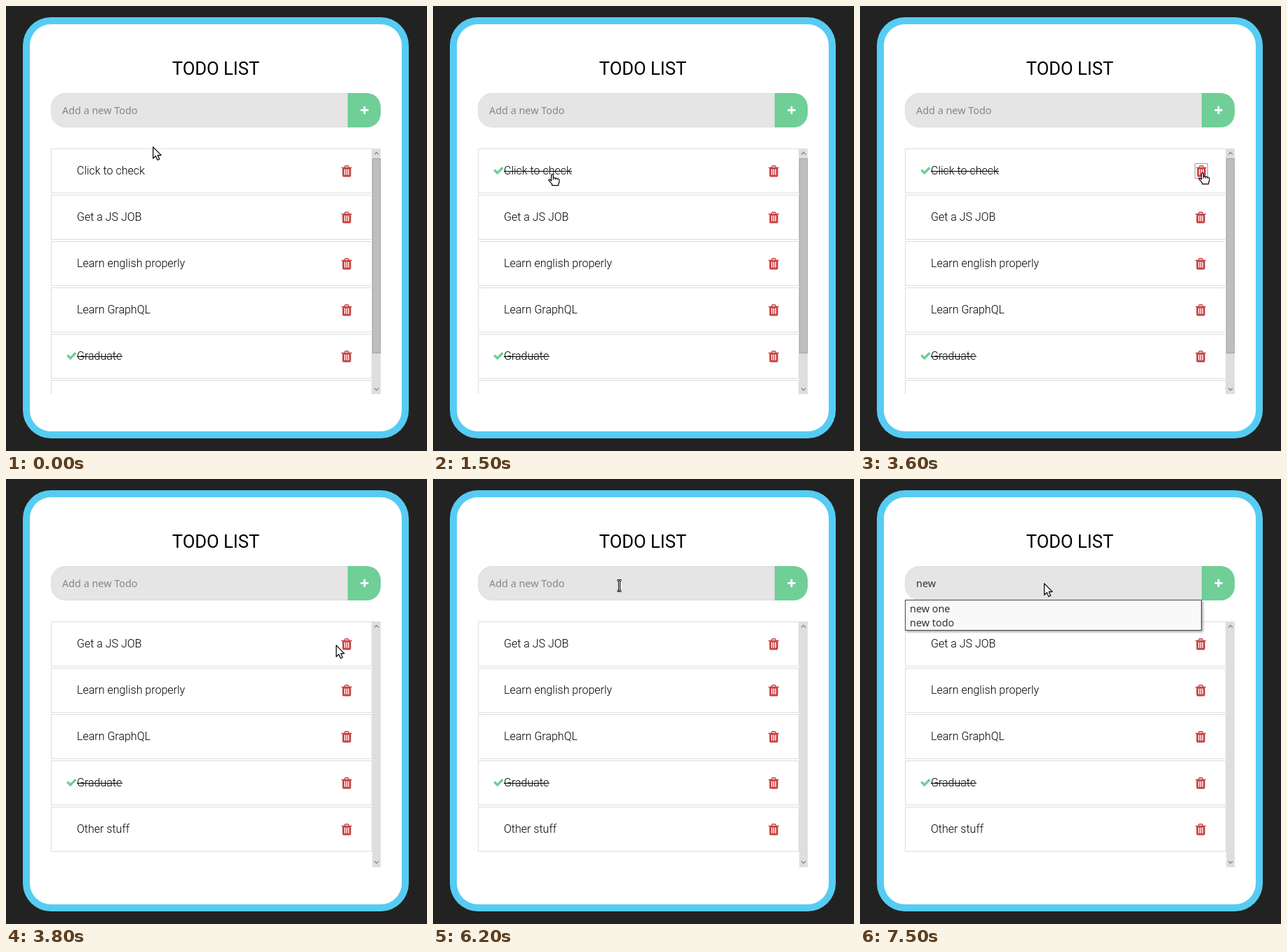
Animation, 600 px wide and 634 px high, one loop 8 s. Source, as an HTML page:

```html
<!DOCTYPE html>
<html lang="en">
<head>
<meta charset="utf-8">
<title>Todo list</title>
<style>
  html, body { margin: 0; width: 100%; height: 100%; overflow: hidden; background: #222; }
  svg { display: block; }
  text { white-space: pre; }
  .title { font: 400 25.6px Roboto, sans-serif; text-anchor: middle; }
  .item { font: 300 16px Roboto, sans-serif; }
  .field { font: 400 14.4px "Noto Sans", "Open Sans", sans-serif; fill: #333; }
  .hint { fill: #868686; }
  .line { fill: none; stroke: #ddd; }
  .trash { fill: #c94040; fill-rule: evenodd; }
  .check { fill: #6fcf97; }
  .chevron { fill: none; stroke: #8c8c8c; stroke-width: 1.5; }
  .popup { fill: #f9f9f9; stroke: #4a4a4a; filter: drop-shadow(2px 2px 1.5px rgba(0, 0, 0, .35)); }

  /* 100 ms = 1.25% of the loop */
  .anim { animation: 8s step-end infinite; }
  #done { animation-name: done; }
  #press { animation-name: press; }
  #focus { animation-name: focus; }
  #list { animation-name: remove; }
  #thumb { animation-name: thumb; }
  #hint { animation-name: hint; }
  #type1 { animation-name: type1; }
  #type2 { animation-name: type2; }
  #type3 { animation-name: type3; }
  #caret { animation-name: caret; }
  #popup { animation-name: popup; }
  #pointer { animation-name: move; }
  #arrow { animation-name: arrow; }
  #hand { animation-name: hand; }
  #beam { animation-name: beam; }

  @keyframes done { 0% { opacity: 0 } 18.75%, 100% { opacity: 1 } }
  @keyframes press { 0%, 46.25%, 100% { transform: none } 45% { transform: translateX(1px) } }
  @keyframes focus { 0%, 46.25%, 100% { opacity: 0 } 45% { opacity: 1 } }
  @keyframes remove { 0% { transform: none } 46.25%, 100% { transform: translateY(-66px) } }
  @keyframes thumb { 0% { opacity: 1 } 46.25%, 100% { opacity: 0 } }
  @keyframes hint { 0% { opacity: 1 } 87.5%, 100% { opacity: 0 } }
  @keyframes type1 { 0%, 88.75%, 100% { opacity: 0 } 87.5% { opacity: 1 } }
  @keyframes type2 { 0%, 90%, 100% { opacity: 0 } 88.75% { opacity: 1 } }
  @keyframes type3 { 0% { opacity: 0 } 90%, 100% { opacity: 1 } }
  @keyframes popup { 0% { opacity: 0 } 88.75%, 100% { opacity: 1 } }
  @keyframes caret {
    0%, 77.5%, 93.75%, 100% { opacity: 0; transform: none }
    62.5% { opacity: 1; transform: none }
    87.5% { opacity: 1; transform: translateX(9px) }
    88.75% { opacity: 1; transform: translateX(17px) }
    90% { opacity: 1; transform: translateX(32px) }
  }
  @keyframes arrow {
    0%, 28.75%, 47.5%, 88.75%, 100% { opacity: 1 }
    11.25%, 36.25%, 60% { opacity: 0 }
  }
  @keyframes hand {
    0%, 28.75%, 47.5%, 100% { opacity: 0 }
    11.25%, 36.25% { opacity: 1 }
  }
  @keyframes beam { 0%, 88.75%, 100% { opacity: 0 } 60% { opacity: 1 } }
  @keyframes move {
    0% { transform: translate(209px, 200px) }
    1.25% { transform: translate(213px, 194px) }
    3.75% { transform: translate(220px, 200px) }
    6.25% { transform: translate(218px, 202px) }
    7.5% { transform: translate(212px, 206px) }
    8.75% { transform: translate(203px, 213px) }
    10% { transform: translate(193px, 221px) }
    11.25% { transform: translate(177px, 229px) }
    12.5% { transform: translate(167px, 236px) }
    13.75% { transform: translate(164px, 239px) }
    27.5% { transform: translate(172px, 243px) }
    28.75% { transform: translate(205px, 256px) }
    30% { transform: translate(262px, 273px) }
    31.25% { transform: translate(335px, 283px) }
    32.5% { transform: translate(402px, 279px) }
    33.75% { transform: translate(455px, 262px) }
    35% { transform: translate(482px, 244px) }
    36.25% { transform: translate(481px, 240px) }
    37.5% { transform: translate(481px, 238px) }
    38.75% { transform: translate(482px, 237px) }
    47.5% { transform: translate(470px, 236px) }
    48.75% { transform: translate(430px, 232px) }
    50% { transform: translate(375px, 224px) }
    51.25% { transform: translate(325px, 214px) }
    52.5% { transform: translate(300px, 210px) }
    57.5% { transform: translate(299px, 206px) }
    58.75% { transform: translate(284px, 178px) }
    60% { transform: translate(262px, 144px) }
    66.25% { transform: translate(261px, 143px) }
    88.75%, 100% { transform: translate(262px, 148px) }
  }
</style>
</head>
<body>
<svg width="600" height="634" viewBox="0 0 600 634">
  <defs>
    <path id="bin" class="trash" transform="translate(478 227)" d="M.4 2.7H3.7L4.5.9Q4.9 0 5.9 0H9.2Q10.2 0 10.6.9L11.4 2.7H14.7Q15.1 2.7 15.1 3.1V3.8Q15.1 4.1 14.7 4.1H13.7V14.3Q13.7 16.5 12 16.5H3.1Q1.4 16.5 1.4 14.3V4.1H.4Q0 4.1 0 3.8V3.1Q0 2.7.4 2.7ZM5.1 2.7H10L9.4 1.4H5.7ZM4.1 5.5h1.4v8.2H4.1ZM6.85 5.5h1.4v8.2h-1.4ZM9.6 5.5H11v8.2H9.6Z"/>
    <path id="tick" class="check" transform="translate(85.4 226.3) scale(.00893)" d="M1671 566q0 40-28 68l-860 860q-28 28-68 28t-68-28l-498-498q-28-28-28-68t28-68l136-136q28-28 68-28t68 28l294 295 656-657q28-28 68-28t68 28l136 136q28 28 28 68z"/>
    <rect id="box" class="line" x="64.5" y="203.5" width="457" height="63"/>
    <g id="row"><use href="#box"/><use href="#bin"/></g>
    <clipPath id="view"><rect x="64" y="203" width="458" height="350"/></clipPath>
  </defs>

  <rect width="600" height="634" fill="#222"/>
  <rect x="24" y="16" width="550" height="600" rx="40" fill="#56ccf2"/>
  <rect x="34" y="26" width="530" height="580" rx="30" fill="#fff"/>
  <text class="title" x="299" y="98">TODO LIST</text>

  <path d="M487 124.500H84.500a20 20 0 0 0-20 20v8a20 20 0 0 0 20 20H487Z" fill="#e5e5e5" stroke="#ddd"/>
  <path d="M487 124h27a20 20 0 0 1 20 20v9a20 20 0 0 1-20 20h-27Z" fill="#6fcf97"/>
  <path d="M505.700 148.300h10.600M511 143v10.600" stroke="#fff" stroke-width="3.400" stroke-linecap="square" stroke-linejoin="round" transform="translate(511 148.300) scale(.8 .8) translate(-511 -148.300)"/>

  <g clip-path="url(#view)">
    <g id="list" class="anim">
      <g>
        <use href="#box"/>
        <g id="press" class="anim"><use href="#bin"/></g>
        <rect id="focus" class="anim" x="477.500" y="224.500" width="18" height="21" fill="none" stroke="#444" stroke-dasharray="1 1"/>
        <text class="item" x="101" y="240">Click to check</text>
        <g id="done" class="anim"><use href="#tick"/><rect x="101" y="235" width="97" height="1"/></g>
      </g>
      <g transform="translate(0 66)"><use href="#row"/><text class="item" x="101" y="240">Get a JS JOB</text></g>
      <g transform="translate(0 132)"><use href="#row"/><text class="item" x="101" y="240">Learn english properly</text></g>
      <g transform="translate(0 198)"><use href="#row"/><text class="item" x="101" y="240">Learn GraphQL</text></g>
      <g transform="translate(0 264)">
        <use href="#row"/><text class="item" x="101" y="240">Graduate</text>
        <use href="#tick"/><rect x="101" y="235" width="65" height="1"/>
      </g>
      <g transform="translate(0 330)"><use href="#row"/><text class="item" x="101" y="240">Other stuff</text></g>
    </g>
  </g>

  <rect x="522" y="203" width="12" height="350" fill="#dedede"/>
  <rect id="thumb" class="anim" x="522.500" y="217.500" width="11" height="277" fill="#bebebe" stroke="#a4a4a4"/>
  <path class="chevron" d="M525 211.500l3-3 3 3M525 544.500l3 3 3-3"/>

  <g class="field">
    <text id="hint" class="hint anim" x="80" y="154">Add a new Todo</text>
    <text id="type1" class="anim" x="80" y="154">n</text>
    <text id="type2" class="anim" x="80" y="154">ne</text>
    <text id="type3" class="anim" x="80" y="154">new </text>
    <rect id="caret" class="anim" x="80" y="140" width="1" height="17"/>
    <g id="popup" class="anim">
      <rect class="popup" x="64.500" y="172.500" width="422" height="43"/>
      <text x="71" y="190">new one</text>
      <text x="71" y="210">new todo</text>
    </g>
  </g>

  <g id="pointer" class="anim" fill="#fff" stroke="#000" stroke-width="1.200" stroke-linejoin="round">
    <path id="arrow" class="anim" d="M.6.8V17.200L4.400 13.700 6.900 19.500 9.700 18.300 7.200 12.600H12.200Z"/>
    <g id="hand" class="anim">
      <path d="M4.600 10V2.100a1.400 1.400 0 0 1 2.800 0V6.300Q8.900 5 10.200 6.600 11.700 5.500 13 7.200 15.600 6.400 15.900 9V12.400L14.800 14.400V16.600H5.600V14.600L1 9.700Q.4 8 2.200 8Z"/>
      <path d="M7.400 6.300V9M10.200 6.600V9M13 7.200V9" stroke-width=".8"/>
    </g>
    <g id="beam" class="anim" fill="none">
      <path id="stem" d="M1.500 1.500H3.300L4.500 2.500 5.700 1.500H7.500M4.500 2.500V15.500M1.500 16.500H3.300L4.500 15.500 5.700 16.500H7.500" stroke-width="3"/>
      <path d="M1.500 1.500H3.300L4.500 2.500 5.700 1.500H7.500M4.500 2.500V15.500M1.500 16.500H3.300L4.500 15.500 5.700 16.500H7.500" stroke="#fff" stroke-width="1"/>
    </g>
  </g>
</svg>
</body>
</html>
```
